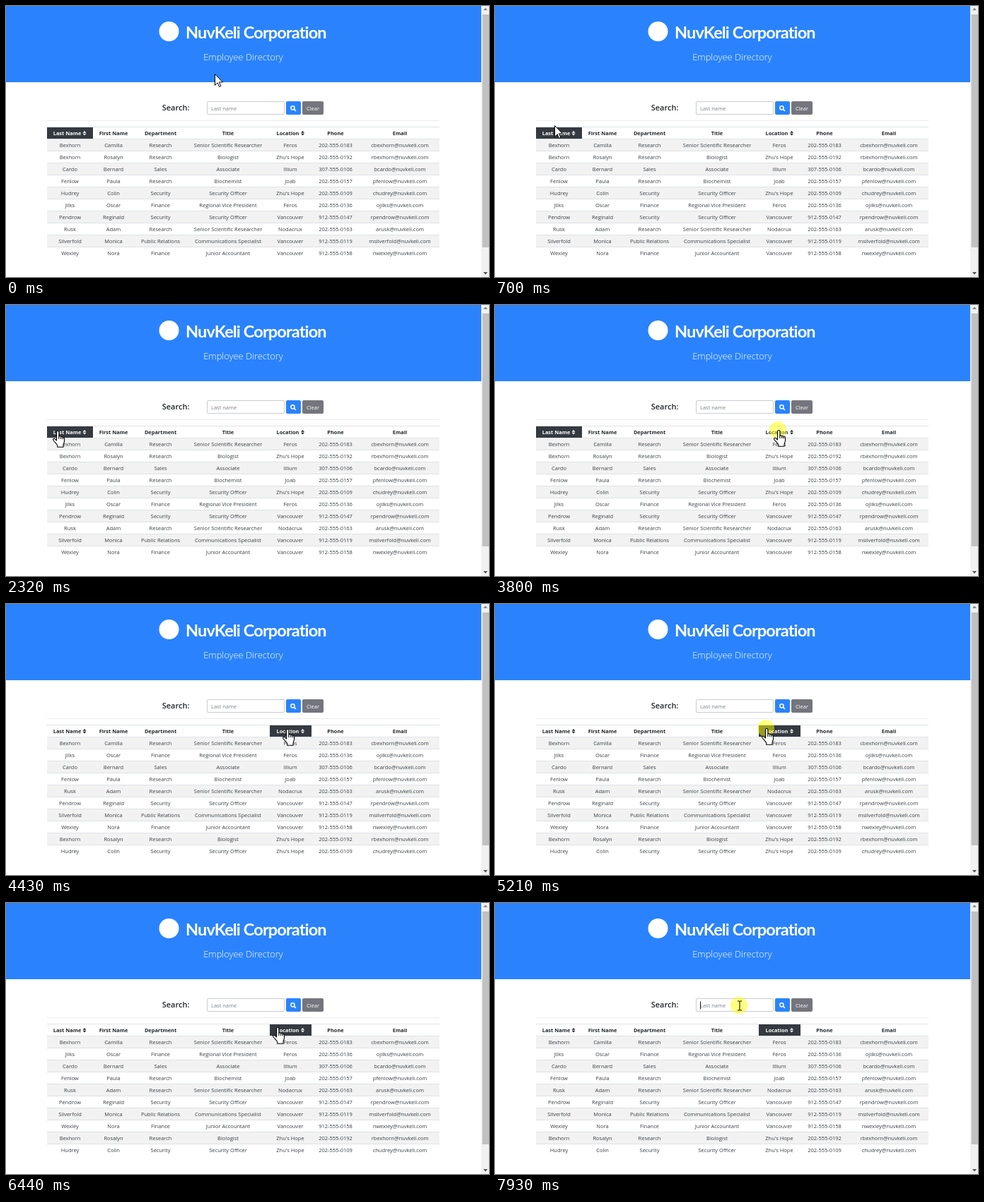
These frames come from a looping animation (683 by 384 pixels, 7.99 s). An HTML page:

```html
<!DOCTYPE html>
<html lang="en">
<head>
<meta charset="utf-8">
<title>Employee Directory</title>
<style>
  html, body { margin: 0; width: 100%; height: 100%; overflow: hidden; background: #fff; }
  svg { display: block; width: 683px; height: 384px; }
  text { font: 7.5px "Open Sans", "Noto Sans", sans-serif; fill: #3a3f44; }
  .mid { text-anchor: middle; }
  .head { font-size: 7.4px; font-weight: 700; fill: #212529; }
  .on { fill: #fff; }
  .brand { font: 700 23.5px Lato, sans-serif; letter-spacing: -.85px; fill: #fff; }
  .sub { font-size: 12.9px; font-weight: 300; fill: #fff; }
  .label { font-size: 11px; font-weight: 600; fill: #212529; }
  .hint { fill: #7a8086; }
</style>
</head>
<body>
<svg viewBox="0 0 683 384">
  <rect width="672" height="108" fill="#2a83fd"/>
  <circle cx="230.5" cy="36" r="14" fill="#fff"/>
  <text class="brand" x="254" y="46">NuvKeli Corporation</text>
  <text class="sub mid" x="335.5" y="77">Employee Directory</text>

  <text class="label" x="220.7" y="148">Search:</text>
  <rect x="284.5" y="135.5" width="109" height="18" rx="1.5" fill="#fff" stroke="#c9ccd2"/>
  <text class="hint" x="290" y="148">Last name</text>
  <path id="caret" d="M290.5 139.500v11" stroke="#222"/>
  <rect x="396" y="135" width="21" height="19" rx="2" fill="#2a83fd"/>
  <g fill="none" stroke="#fff" stroke-width="1.5" stroke-linecap="round">
    <circle cx="405.400" cy="144.300" r="2.600"/>
    <path d="M407.500 146.400l2 2"/>
  </g>
  <rect x="419" y="135" width="30" height="19" rx="2" fill="#75757d"/>
  <text class="on mid" x="434" y="148">Clear</text>
  <path d="M58 162.500H613" stroke="#ececec"/>

  <g id="grid"></g>
  <g id="header"></g>
  <g id="rows"></g>

  <rect x="672" width="11" height="384" fill="#f1f1f1"/>
  <rect x="673.500" y="12" width="9.500" height="330" fill="#c1c1c1"/>
  <path d="M675 6l3-3.500 3 3.500z" fill="#8a8a8a"/>
  <path d="M675 377l3 3.500 3-3.500z" fill="#505050"/>

  <circle id="click" r="12" fill="#ff0" opacity=".5"/>
  <g id="cursor" stroke-linejoin="round">
    <path id="arrow" d="M.5 .5V16.300L4.200 12.800 6.600 18.500 8.900 17.500 6.500 11.900H11.500Z" fill="#fff" stroke="#000"/>
    <g id="hand" transform="translate(-6 0)" stroke="#000" stroke-width="1.100">
      <path fill="#fff" d="M5.500 14V2.200a1.700 1.700 0 0 1 3.400 0V8c1-.7 2.500-.4 2.800.7 1-.6 2.200-.1 2.500.9 1.200-.4 2.300.3 2.300 1.600V15c0 2-1.500 4-1.500 6v2.300H6.800V21C5.800 18.800 3 16.500 .8 13.500c-.9-1.700 1.100-3 2.600-1.700z"/>
      <path fill="none" d="M8.900 8v4M11.700 8.700V12M14.200 9.600V12.300"/>
    </g>
    <path id="beam" d="M-2 -6h2q1 0 1 1V6q0 1-1 1h-2M4 -6h-2q-1 0-1 1M4 7h-2q-1 0-1-1" fill="none" stroke="#000"/>
  </g>
</svg>
<script>
const LOOP = 7990;
const $ = id => document.getElementById(id);

const columns = [
  ["Last Name", 90.5], ["First Name", 152], ["Department", 218.5], ["Title", 314],
  ["Location", 402], ["Phone", 466], ["Email", 557]
];
const LAST = 0, LOCATION = 4;
const sortable = {
  [LAST]: { left: 58, right: 123, text: 86.5, icon: 111 },
  [LOCATION]: { left: 373, right: 432, text: 398.5, icon: 419.5 }
};

const staff = `Bexhorn|Camilla|Research|Senior Scientific Researcher|Feros|202-555-0183
Bexhorn|Rosalyn|Research|Biologist|Zhu's Hope|202-555-0192
Cardo|Bernard|Sales|Associate|Illium|307-555-0106
Fenlow|Paula|Research|Biochemist|Joab|202-555-0157
Hudrey|Colin|Security|Security Officer|Zhu's Hope|202-555-0109
Jilks|Oscar|Finance|Regional Vice President|Feros|202-555-0136
Pendrow|Reginald|Security|Security Officer|Vancouver|912-555-0147
Rusk|Adam|Research|Senior Scientific Researcher|Nodacrux|202-555-0163
Silverfold|Monica|Public Relations|Communications Specialist|Vancouver|912-555-0119
Wexley|Nora|Finance|Junior Accountant|Vancouver|912-555-0158`
  .split("\n").map(line => {
    const cells = line.split("|");
    return [...cells, (cells[1][0] + cells[0]).toLowerCase() + "@nuvkeli.com"];
  });

// [time, column, direction]
const sorts = [
  [0, LAST, 1], [1160, LAST, -1], [2320, LAST, 1],
  [3880, LOCATION, 1], [5290, LOCATION, -1], [6440, LOCATION, 1]
];

// [start, end, steps, x, y]
const moves = [
  [70, 780, 10, 59, 177], [1560, 1790, 4, 72, 178], [3100, 3500, 6, 400, 177],
  [4430, 4510, 2, 393, 177], [4660, 4810, 3, 383, 176], [7460, 7780, 5, 345, 145]
];

const clicks = [[1100, 1160], [2260, 2320], [3800, 3880], [5210, 5290], [6280, 6440], [7930, LOOP]];

const label = (x, y, text, style = "") => `<text class="mid ${style}" x="${x}" y="${y}">${text}</text>`;
const show = (id, visible) => $(id).setAttribute("visibility", visible ? "visible" : "hidden");

function drawGrid() {
  let out = "";
  for (let i = 0; i < 10; i++) {
    const y = 188 + 17 * i;
    if (i % 2 === 0) out += `<rect x="58" y="${y}" width="555" height="17" fill="#f2f2f2"/>`;
    out += `<path d="M58 ${y + .5}H613" stroke="#dee2e6"/>`;
  }
  $("grid").innerHTML = out + '<path d="M58 171.5H613" stroke="#dee2e6"/>';
}

function drawHeader(active) {
  $("header").innerHTML = columns.map(([name, x], i) => {
    const cell = sortable[i];
    if (!cell) return label(x, 183, name, "head");
    const on = i === active;
    const box = on ? `<rect x="${cell.left}" y="172" width="${cell.right - cell.left}" height="16" fill="#343a40"/>` : "";
    const icon = `<path d="M${cell.icon - 2.5} 179.800l2.500-2.800 2.500 2.800zm0 1l2.500 2.800 2.500-2.800z" fill="${on ? "#fff" : "#212529"}"/>`;
    return box + label(cell.text, 183, name, on ? "head on" : "head") + icon;
  }).join("");
}

function drawRows(column, direction) {
  const sorted = [...staff].sort((a, b) =>
    direction * ((a[column] > b[column]) - (a[column] < b[column])));
  $("rows").innerHTML = sorted.map((person, row) =>
    person.map((value, i) => label(columns[i][1], 200 + 17 * row, value)).join("")).join("");
}

function pointerAt(t) {
  let x = 295, y = 96;
  for (const [start, end, steps, toX, toY] of moves) {
    if (t < start) break;
    const step = Math.min(steps, 1 + Math.floor((t - start) / (end - start) * (steps - 1)));
    const p = step / steps, eased = p * p * (3 - 2 * p);
    x += (toX - x) * eased;
    y += (toY - y) * eased;
  }
  return [Math.round(x), Math.round(y)];
}

function cursorFor(x, y) {
  if (y > 171 && y < 189) {
    if (Object.values(sortable).some(c => x >= c.left && x <= c.right)) return "hand";
    if (x > 123 && x < 373) return "beam";
  }
  return x > 284 && x < 394 && y > 135 && y < 154 ? "beam" : "arrow";
}

let currentSort;
function render(t) {
  const sort = sorts.findLast(([time]) => t >= time);
  if (sort !== currentSort) {
    currentSort = sort;
    drawHeader(sort[1]);
    drawRows(sort[1], sort[2]);
  }
  const [x, y] = pointerAt(t), shape = cursorFor(x, y);
  $("cursor").setAttribute("transform", `translate(${x} ${y})`);
  for (const id of ["arrow", "hand", "beam"]) show(id, id === shape);
  $("click").setAttribute("cx", x);
  $("click").setAttribute("cy", y);
  show("click", clicks.some(([from, to]) => t >= from && t < to));
  show("caret", t >= 7930);
}

drawGrid();
const begin = performance.now();
function tick() {
  render((performance.now() - begin) % LOOP);
  requestAnimationFrame(tick);
}
tick();
</script>
</body>
</html>
```
